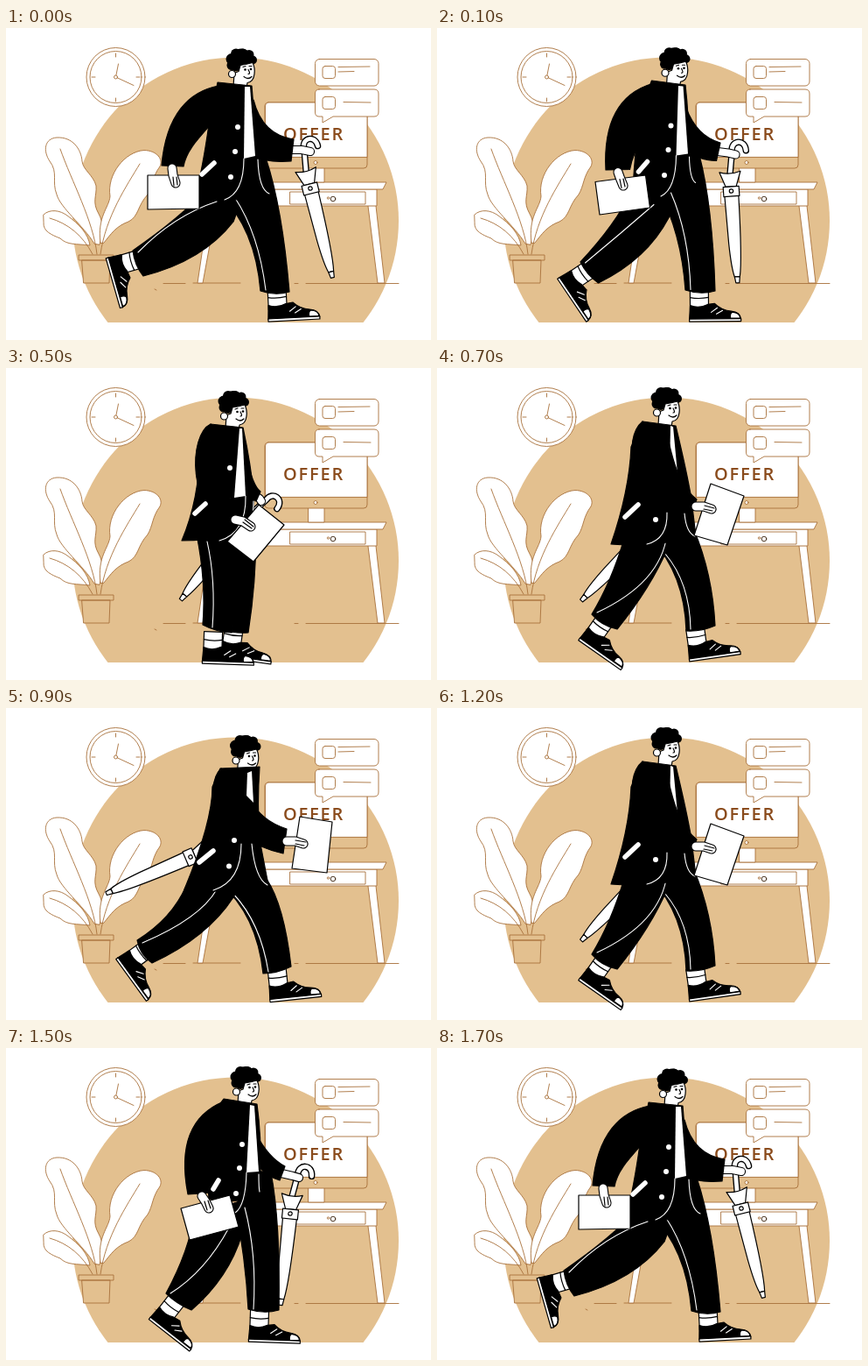
An HTML page for the animation above (1.8 s loop, 486 by 356 pixels).

```html
<!DOCTYPE html>
<html lang="en">
<head>
<meta charset="utf-8">
<title>Walking to an offer</title>
<style>
  html, body { margin: 0; width: 100%; height: 100%; overflow: hidden; background: #fff; }
  svg { display: block; width: 486px; height: 356px; }
  .room { stroke: #a9713c; stroke-width: .9; stroke-linejoin: round; stroke-linecap: round; }
  .ink { stroke: #000; stroke-width: 1.2; stroke-linejoin: round; stroke-linecap: round; }
  .seam { fill: none; stroke: #fff; stroke-width: 1.1; stroke-linecap: round; }
</style>
</head>
<body>
<svg viewBox="0 0 486 356">
  <defs>
    <clipPath id="ground"><path d="M0 0H486V336H0Z"/></clipPath>
    <g id="shoe">
      <path class="ink" fill="#fff" d="M-10 -17H11V6H-10Z"/>
      <path class="ink" fill="none" d="M-10 -8Q0 -6 11 -8"/>
      <path class="ink" d="M-11 17L-10 1Q0 5 10 0L18 -1Q26 7 37 8Q47 9 48 17Z"/>
      <path class="ink" fill="#fff" d="M36 16Q35 11 38 9Q47 10 47 16Z"/>
      <path class="ink" fill="#fff" d="M-11 16.500H48V19.500H-11Z"/>
      <path class="seam" d="M14 9L21 4M20 11L27 7"/>
    </g>
  </defs>

  <circle cx="262.500" cy="220" r="186.500" fill="#e3c08f" clip-path="url(#ground)"/>

  <g class="room" fill="#fff">
    <circle cx="125.500" cy="56" r="33.500"/>
    <circle cx="125.500" cy="56" r="29.500"/>
    <path fill="none" d="M125.500 29v4M125.500 80v4M98 56h4M149 56h4M125.500 56L128.500 41M125.500 56L146 65.500"/>
    <circle cx="125.500" cy="56" r="2"/>

    <path d="M43 213C50 206 62 208 70 214C84 224 94 235 96 248C80 246 70 248 62 240C52 236 42 232 43 222Z"/>
    <path fill="none" d="M50 217Q82 226 99 258"/>
    <path d="M101 246C88 225 62 205 58 190C52 175 60 165 50 152C42 140 44 126 58 125C76 124 86 138 87 152C88 162 100 168 103 180C104 192 98 198 106 212C112 222 110 235 107 247Z"/>
    <path fill="none" d="M62 138C75 175 100 220 104 258"/>
    <path d="M108 245C104 215 118 205 119 192C115 167 136 141 158 139.500C173 140 180 150 176 158C167 170 168 180 162 190C150 203 152 215 140 221C126 226 120 235 112 245Z"/>
    <path fill="none" d="M153 155C138 180 114 215 108 258"/>
    <path fill="#e3c08f" d="M87 265H119L118 291H89ZM83.500 259H123V265H83.500Z"/>

    <path fill="none" d="M170 298l2 1M180 291.500H205M214 291H268M330 291.500H334M343 291.500H449"/>

    <path d="M232 204L219 291H225L241 204ZM414 203L425 291H433L423 203Z"/>
    <path d="M229 184H424V203H229Z"/>
    <path d="M325 187H411V201H325Z"/>
    <path d="M222 176H435L431 184H226Z"/>
    <circle cx="374" cy="195" r="2.800" stroke="#3a2410"/>
    <circle cx="368.500" cy="194" r="1.200"/>
    <path d="M346 159H364V176H346Z"/>
    <rect x="296" y="85" width="117" height="75" rx="4" fill="#e3c08f"/>
    <path d="M296.500 147V89Q296.500 85 300 85H409Q413 85 413 89V147Z"/>
    <circle cx="354" cy="153.500" r="2"/>

    <rect x="353.500" y="35.500" width="72.500" height="30.500" rx="5"/>
    <path d="M358 70H421Q426 70 426 75V96Q426 101 421 101H374L362 108V101H358Q353.500 101 353.500 96V75Q353.500 70 358 70Z"/>
    <rect x="362" y="43.500" width="14.500" height="14" rx="3"/>
    <rect x="362" y="78.500" width="14.500" height="14" rx="3"/>
    <path fill="none" d="M380 44.500L416 44M380 50L398 49.500M386 84.500L417 85"/>
  </g>
  <text x="317" y="127.500" font-family="'Open Sans', 'Noto Sans', sans-serif" font-size="20" font-weight="600" letter-spacing="1.800" fill="#8a4b1c">OFFER</text>

  <g id="walker"></g>
</svg>
<script>
const NS = "http://www.w3.org/2000/svg";
const walker = document.getElementById("walker");

// Each part has five key poses, from near leg forward to far leg forward.
const moving = [];

function add(tag, attrs, keyAttr, keys) {
  const el = document.createElementNS(NS, tag);
  for (const name in attrs) el.setAttribute(name, attrs[name]);
  walker.append(el);
  moving.push({ el, keyAttr, keys });
  return el;
}

const shape = (keys, attrs) => add("path", attrs, "d", keys);
const black = keys => shape(keys, { class: "ink", fill: "#000" });
const white = keys => shape(keys, { class: "ink", fill: "#fff" });
const seam = keys => shape(keys, { class: "seam" });

function rigid(poses, markup) {
  const keys = poses.map(([x, y, turn = 0]) => `translate(${x} ${y}) rotate(${turn})`);
  add("g", {}, "transform", keys).innerHTML = markup;
}

function limb(keys, width) {
  const base = { fill: "none", "stroke-linecap": "round", "stroke-linejoin": "round" };
  shape(keys, { ...base, stroke: "#000", "stroke-width": width + 2.2 });
  shape(keys, { ...base, stroke: "#fff", "stroke-width": width });
}

// Far side: umbrella, arm and leg
const hook = "M0 -20L4 -45C3 -58 20 -59 20 -45";
rigid([[348, 183, -14], [325, 189, 6], [266, 183, 39], [238, 190, 44], [211, 170, 66.6]], `
  <path d="${hook}" fill="none" stroke="#000" stroke-width="7.500" stroke-linecap="round"/>
  <path d="${hook}" fill="none" stroke="#fff" stroke-width="4.800" stroke-linecap="round"/>
  <g class="ink" fill="#fff" stroke-width="1.400">
    <path d="M-8 5L-7 60Q-6 88 -3 98H3Q7 80 8 5Z"/>
    <path d="M-3 98H3L2 105H-2Z"/>
    <path d="M-12 -22Q0 -18 12 -22L6 -5H-6Z"/>
    <path d="M-9 -5H9V6H-9Z"/>
    <circle cx="0" cy="0" r="2.200"/>
  </g>`);

limb(["M327 139L338 139L348 141", "M315 143L328 146L335 148", "M287 147L290 149L292 152",
      "M252 140L258 150L262 155", "M240 148L243 150L246 152"], 8);
black(["M283 82Q293 122 329 127L326 152Q296 154 284 146Z",
       "M286 98Q300 125 319 135L313 151Q298 146 289 135Z",
       "M274 98Q282 135 291 141L286 152Q278 145 274 130Z",
       "M262 90Q262 120 258 140L245 138Q250 110 250 90Z",
       "M262 95Q252 120 250 150L240 148Q245 120 250 95Z"]);

const shoe = '<use href="#shoe"/>';
rigid([[136, 268, 74], [184, 301, 38], [258, 312, 8], [297, 314, -8], [311, 315, -6]], shoe);
black(["M228 185Q200 216 145 254Q147 271 157 283Q225 266 260 221L275 180Z",
       "M215 190Q210 230 183 280Q195 292 212 299Q255 262 270 212L285 170Z",
       "M235 190Q243 240 245 298Q260 303 277 302Q286 245 286 185L285 170Z",
       "M245 195Q283 235 285 300Q302 301 318 294Q315 235 294 185L285 175Z",
       "M245 200Q287 236 294 303Q310 303 326 295Q318 225 298 195L285 180Z"]);
seam(["M241 198Q192 214 151 256", "M255 205Q228 255 188 280", "M262 200Q270 240 258 298",
      "M261 212Q289 245 290 298", "M260 212Q291 245 300 301"]);

// Near leg
rigid([[310, 315, -3], [289, 316, 2], [236, 318, 2], [182, 301, 35], [148, 284, 54]], shoe);
black(["M245 190Q285 229 291 300Q308 306 324 301Q316 205 297 148L284 146Z",
       "M262 180Q274 240 277 298Q295 304 312 299Q314 200 303 142L285 140Z",
       "M218 190Q229 245 225 293Q240 301 258 302Q270 250 286 188L282 150Z",
       "M214 195Q199 245 177 281Q188 294 206 298Q245 250 264 205L280 170Z",
       "M206 203Q190 240 150 265Q153 282 167 291Q230 262 260 216L280 180Z"]);
seam(["M262 194Q289 235 297 299", "M273 182Q287 235 283 298", "M230 198Q240 242 236 296",
      "M263 190Q256 245 183 279", "M241 207Q222 240 156 268"]);

const curls = [[0, -3, 11], [-11, -2, 6.5], [-11, 5, 5.5], [-6, -8, 6], [2, -8.5, 5.5],
               [9, -7, 5.5], [13, -1, 5], [-6, 7, 5]];
rigid([[269, 37.5], [274, 35], [260, 40], [262, 36], [273.5, 45]], `
  ${curls.map(([x, y, r]) => `<circle cx="${x}" cy="${y}" r="${r}"/>`).join("")}
  <path class="ink" fill="#fff" d="M-8 14L-3 12L-1 5Q6 4 13 2Q16 8 15 15Q14 24 7 25L6 31L-9 29Z"/>
  <circle class="ink" cx="-10.500" cy="15" r="4" fill="#fff"/>
  <circle cx="4.500" cy="10" r="1.300"/><circle cx="11" cy="9.500" r="1.300"/>
  <path class="ink" fill="none" stroke-width="1" d="M8 10Q11 15 8 15M3 18Q8 22 12 18M2 7L5 6M9 6L12 6"/>`);

// Jacket
black(["M242 62L281 66Q284 100 286 148L303 189Q272 200 216 194Q225 160 232 110Z",
       "M249 58L287 64Q292 100 291 142L290 165Q265 180 232 172Q228 120 232 80Z",
       "M234 64L271 68Q280 110 284 150L280 172Q258 197 201 197Q221 150 222 90Z",
       "M235 61L273 66Q286 120 291 150L296 192Q250 205 199 201Q220 140 222 90Z",
       "M245 69L290 67Q287 110 290 150L300 202Q250 213 204 207Q236 130 236 90Z"]);
shape(["M273 67L279 67L285 146L272 149Z", "M279 65L284 66L289 141L275 142Z",
       "M267 69L270 69L274 146L261 148Z", "M267 66L270 67L276 131L266 119Z",
       "M276 74L281 72L283 108L275 100Z"], { fill: "#fff" });
seam(["M272 149Q272 188 250 196", "M275 142Q274 180 262 188", "M274 146Q275 188 244 197",
      "M263 165Q264 195 240 201", "M269 155Q269 198 237 208"]);
seam(["M288 150Q289 184 301 189", "M289 144Q289 160 290 164", "M283 152Q283 165 281 171",
      "M283 166Q285 188 295 192", "M281 155Q285 195 299 202"]);

const buttons = [
  [[265, 113], [270, 110], [256, 114], [250, 110], [256, 112]],
  [[262, 141], [267, 137], [254, 150], [252, 136], [261, 151]],
  [[257, 170], [263, 166], [254, 171], [250, 173], [255, 180.5]]
];
buttons.forEach(places => rigid(places, '<circle r="3" fill="#fff"/>'));

// Near arm and paper
black(["M243 66C210 72 183 98 178 157L203 158C206 140 220 126 236 108Z",
       "M249 61C212 76 197 110 208 167L238 165C242 140 255 120 258 95Z",
       "M234 64C208 76 208 165 257 181L263 165C258 150 242 120 248 80Z",
       "M235 61C212 80 218 150 290 166L297 150C285 140 275 130 264 80Z",
       "M246 69C225 90 240 148 317 166L321 138C300 131 290 122 274 100Z"]);
shape(["M224 167L238 154", "M237 161L243 151", "M216 166L228 155", "M215 170L230 156", "M221 176L237 163"],
      { stroke: "#fff", "stroke-width": 5.5, "stroke-linecap": "round" });

white(["M162 168L221 168L221 206L162 207Z", "M200 183L256 168L266 204L210 219Z",
       "M253 198L289 156L318 179L283 221Z", "M294 191L313 132L351 146L332 202Z",
       "M327 183L336 124L373 130L367 188Z"]);
limb(["M190 160L191 168L194 177", "M224 169L228 175L232 183", "M262 173L271 175L280 181",
      "M296 158L305 158L314 161", "M321 152L331 152L340 155"], 9);
shape(["M191 170L192 180M195 170L196 179", "M227 175L230 185M231 174L234 183",
       "M271 176L281 183M273 173L283 181", "M306 157L317 160M305 161L315 163",
       "M331 151L343 153M331 155L341 157"], { class: "ink", fill: "none", "stroke-width": .8 });

const numbers = /-?\d+(?:\.\d+)?/g;

function blend(from, to, amount) {
  const ends = to.match(numbers);
  let i = 0;
  return from.replace(numbers, n => (+n + (ends[i++] - n) * amount).toFixed(2));
}

// Stride position per 100 ms; the walk swings out, holds and swings back.
const stride = [0, .5, .5, 1, 1.5, 2, 2.5, 3, 3.5, 4, 4, 3.5, 3, 2.33, 1.67, 1, .5, 0];
let shown = -1;

function render(ms) {
  const step = Math.floor(ms % 1800 / 100);
  if (step === shown) return;
  shown = step;
  const at = stride[step];
  const first = Math.min(3, Math.floor(at));
  for (const { el, keyAttr, keys } of moving) {
    el.setAttribute(keyAttr, blend(keys[first], keys[first + 1], at - first));
  }
}

const start = performance.now();
function loop(now) {
  render(Math.max(0, now - start));
  requestAnimationFrame(loop);
}
render(0);
requestAnimationFrame(loop);
</script>
</body>
</html>
```
